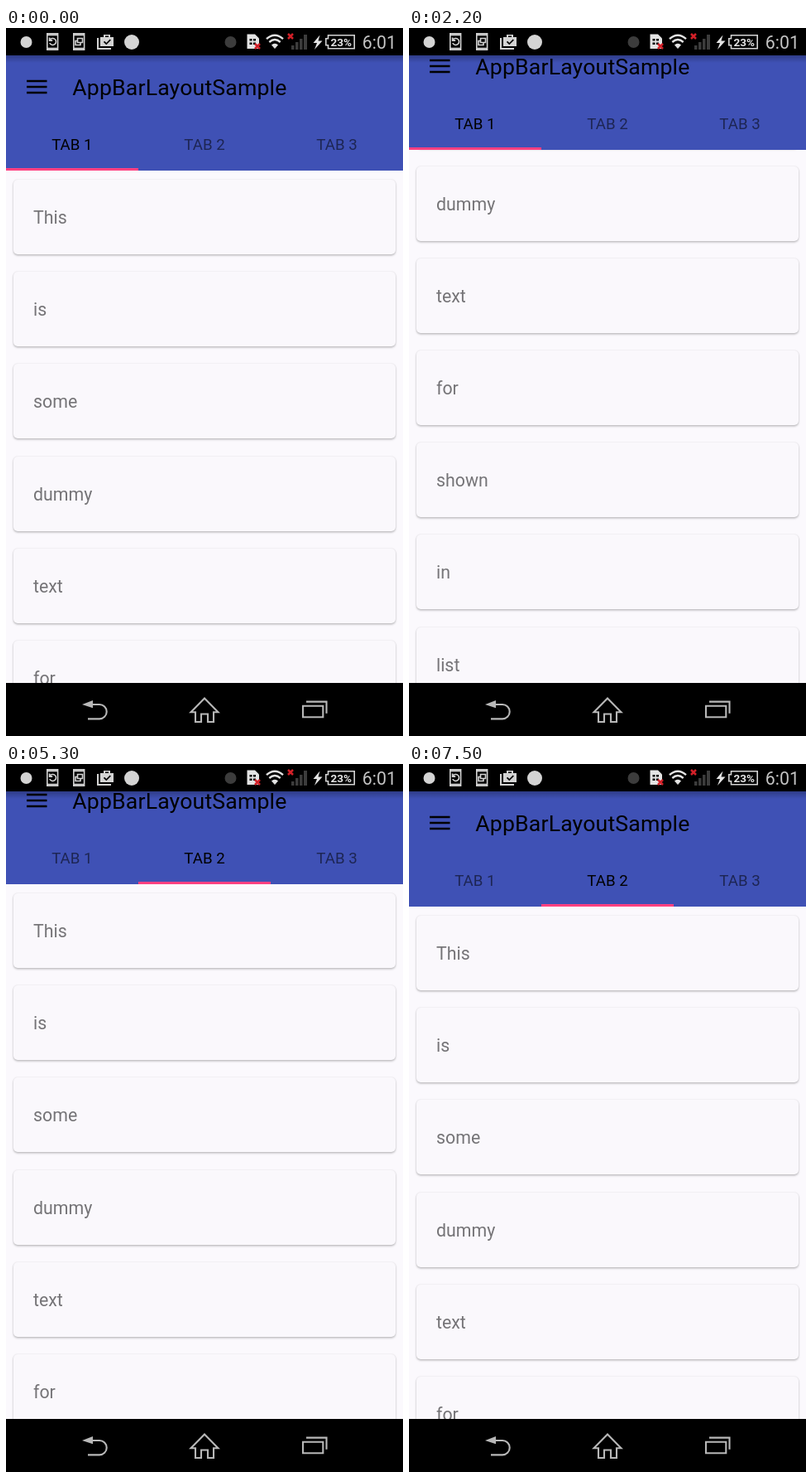
An HTML page for the animation above (8000 ms loop, 480 by 854 pixels).

```html
<!DOCTYPE html>
<html lang="en">
<head>
<meta charset="utf-8">
<title>AppBarLayoutSample</title>
<style>
html, body { margin: 0; width: 100%; height: 100%; overflow: hidden; background: #000; }
#stage { position: absolute; left: 0; top: 0; width: 480px; height: 854px; overflow: hidden; background: #fbf9fd; font-family: Roboto, "Noto Sans", sans-serif; }
#pages, .page, .card, #header, #stage > svg { position: absolute; left: 0; top: 0; }
.page { width: 480px; }
.page + .page { left: 480px; }
.card {
  left: 9px; width: 462px; height: 90px; box-sizing: border-box; padding-left: 24px;
  font-size: 21.33px; line-height: 92px; color: #757477;
  background: #faf8fc; border-radius: 5px;
  box-shadow: 0 1.5px 2.5px rgba(0,0,0,.24), 0 0 2px rgba(0,0,0,.1);
}
#header { width: 480px; height: 172px; }
#header text { font-size: 18.67px; }
#header .title { font-size: 26.67px; letter-spacing: .15px; }
.tab { text-anchor: middle; fill-opacity: .54; }
.tab.on { fill-opacity: 1; }
#shade { position: absolute; top: 33px; width: 480px; height: 9px; background: linear-gradient(rgba(0,0,0,.25), transparent); }
</style>
</head>
<body>
<div id="stage">
  <div id="pages"><div class="page"></div><div class="page"></div></div>

  <svg id="header" width="480" height="172">
    <rect width="480" height="172" fill="#3f51b5"/>
    <rect id="press" x="160" y="108" width="160" height="64" fill="#888" fill-opacity=".2"/>
    <path d="M25 64h24.5M25 71h24.5M25 78h24.5" stroke="#000" stroke-width="2.6"/>
    <text class="title" x="80.3" y="81">AppBarLayoutSample</text>
    <text class="tab" x="79.8" y="147.3">TAB 1</text>
    <text class="tab" x="240" y="147.3">TAB 2</text>
    <text class="tab" x="400" y="147.3">TAB 3</text>
    <rect id="mark" y="169" width="160" height="3" fill="#ff4081"/>
  </svg>
  <div id="shade"></div>

  <svg width="480" height="854" fill="none">
    <path d="M0 0h480v33H0zM0 790h480v64H0z" fill="#000"/>

    <!-- notifications -->
    <g fill="#d4d4d4">
      <circle cx="24.5" cy="17" r="7"/>
      <circle cx="152" cy="17" r="9"/>
      <path d="M110 12h2v12h15v2h-17zM114 11h4V8h8v3h4v11h-16zM120 11h4v-1.5h-4z"/>
    </g>
    <g stroke="#d4d4d4" stroke-width="1.6">
      <path d="M49.8 6.8h12.8v19.5H49.8zM81.8 6.8h12.8v19.5H81.8z"/>
      <path d="M50 8.2h12.5M50 24.7h12.5M82 8.2h12.5M82 24.7h12.5" stroke-width="2"/>
      <path d="M53 14.5a4 4 0 1 1-.2 3.5M52.6 11.5v3.6h3.6"/>
      <path d="M86.5 12.5h6v5h-6zM86.5 15.5h-2.5v5h6v-3"/>
    </g>
    <path d="M118.5 16.3l2.8 2.8 5-5" stroke="#000" stroke-width="1.7"/>

    <!-- system state -->
    <circle cx="271.5" cy="17" r="7" fill="#3c3c3c"/>
    <path d="M291.5 7.5h9.5l5 5V25h-14.5z" fill="#e4e4e4"/>
    <path d="M294.5 13h3v2.5h-3zM299 13h3v2.5h-3zM294.5 17.5h3V20h-3zM299 17.5h3V20h-3z" fill="#000"/>
    <path d="M301 19l6 6M307 19l-6 6M341 7l6 6M347 7l-6 6" stroke="#d32028" stroke-width="2.5"/>
    <path d="M345 21h3.5v5H345zM350 17h3.5v9H350zM355 13h3.5v13H355zM360 8h4v18h-4z" fill="#3c3c3c"/>
    <g stroke="#e4e4e4" stroke-width="2.4">
      <path d="M315 13.2q10-9 20 0M318.3 17q6.7-5.8 13.4 0"/>
      <path id="dot" d="M321.5 20.5q3.5-2.8 7 0l-3.5 4z" fill="#e4e4e4" stroke-width="1"/>
      <g id="traffic" stroke="none" fill="#e4e4e4">
        <circle cx="325" cy="20.5" r="2"/>
        <path d="M315.5 22l3.5-4 3.5 4h-2v4h-3v-4zM327.5 22l3.5 4 3.5-4h-2v-4h-3v4z"/>
      </g>
    </g>
    <path d="M379.5 8.5L371.5 18h4.5l-3 8 9.5-10.5h-5z" fill="#e4e4e4"/>
    <path d="M389.5 8.8h31.7v15.9h-31.7v-4h-2.7v-8h2.7z" stroke="#d4d4d4" stroke-width="1.6"/>
    <text x="405.3" y="21.6" font-size="13.5" font-weight="700" text-anchor="middle" fill="#e4e4e4">23%</text>
    <text x="430.8" y="25" font-size="21.33" fill="#c4c4c4">6:01</text>

    <!-- navigation keys -->
    <g stroke="#b8b8b8" stroke-width="2.1">
      <path d="M104 816h9a8.7 8.7 0 0 1 0 17.4H99"/>
      <path d="M92 816l13-5v9.3z" fill="#b8b8b8" stroke="none"/>
      <path d="M223.5 825.3L240 808.4l16.5 16.9H251V837h-7v-9.5h-8v9.5h-7v-11.7z"/>
      <path d="M359 817.8h24.3v13.4H359zM363 812.6h24.5v14.2"/>
    </g>
  </svg>
</div>

<script>
const LOOP = 8000, STEP = 100, BAR = 75, PITCH = 111.2;
const words = ['This', 'is', 'some', 'dummy', 'text', 'for', 'shown', 'in', 'list', ''];
// Scroll gestures as [time, distance], each with one turning point
const swipes = [
  [[1100, 0], [1300, 60], [1500, 210], [1700, 327], [1900, 390], [2000, 400],
   [2200, 350], [2600, 165], [2900, 0]],
  [[5200, 0], [5500, 80], [5900, 300], [6200, 390], [6400, 409], [6500, 402],
   [6700, 364], [7000, 180], [7300, 30], [7500, 0]]
];

const $ = id => document.getElementById(id);
const clamp = (v, lo, hi) => Math.min(hi, Math.max(lo, v));
const tabs = document.querySelectorAll('.tab');
const pages = document.querySelectorAll('.page');

for (const page of pages) {
  words.forEach((word, i) => {
    const card = document.createElement('div');
    card.className = 'card';
    card.style.top = Math.round(183 + i * PITCH) + 'px';
    card.textContent = word;
    page.append(card);
  });
}

function along(points, t) {
  const i = points.findIndex(p => p[0] >= t);
  if (i < 0) return points[points.length - 1][1];
  if (i === 0) return points[0][1];
  const [t0, a] = points[i - 1], [t1, b] = points[i];
  return a + (b - a) * (t - t0) / (t1 - t0);
}

// The bar leaves first on the way up and returns first on the way down
function barShift(points, t, scroll) {
  const [turn, peak] = points.reduce((m, p) => p[1] > m[1] ? p : m);
  return clamp(t <= turn ? scroll : BAR - (peak - scroll), 0, BAR);
}

function render(t) {
  const swipe = swipes[t < 4000 ? 0 : 1];
  const scroll = Math.round(along(swipe, t));
  const slide = 1 - (1 - clamp((t - 4200) / 400, 0, 1)) ** 3;
  const active = t > 4200 ? 1 : 0;
  const busy = t >= 3000 && t < 5000;

  $('header').style.transform = `translateY(${-barShift(swipe, t, scroll)}px)`;
  $('pages').style.transform = `translateX(${-480 * slide}px)`;
  for (const page of pages) page.style.transform = `translateY(${-scroll}px)`;
  $('mark').setAttribute('x', 160 * slide);
  $('press').style.opacity = t < 4200 ? 0 : clamp(1 - (t - 4200) / 300, 0, 1);
  tabs.forEach((tab, i) => tab.classList.toggle('on', i === active));
  $('traffic').style.display = busy ? '' : 'none';
  $('dot').style.display = busy ? 'none' : '';
}

function tick() {
  const t = performance.now() % LOOP;
  render(Math.floor(t / STEP) * STEP);
  requestAnimationFrame(tick);
}
tick();
</script>
</body>
</html>
```
